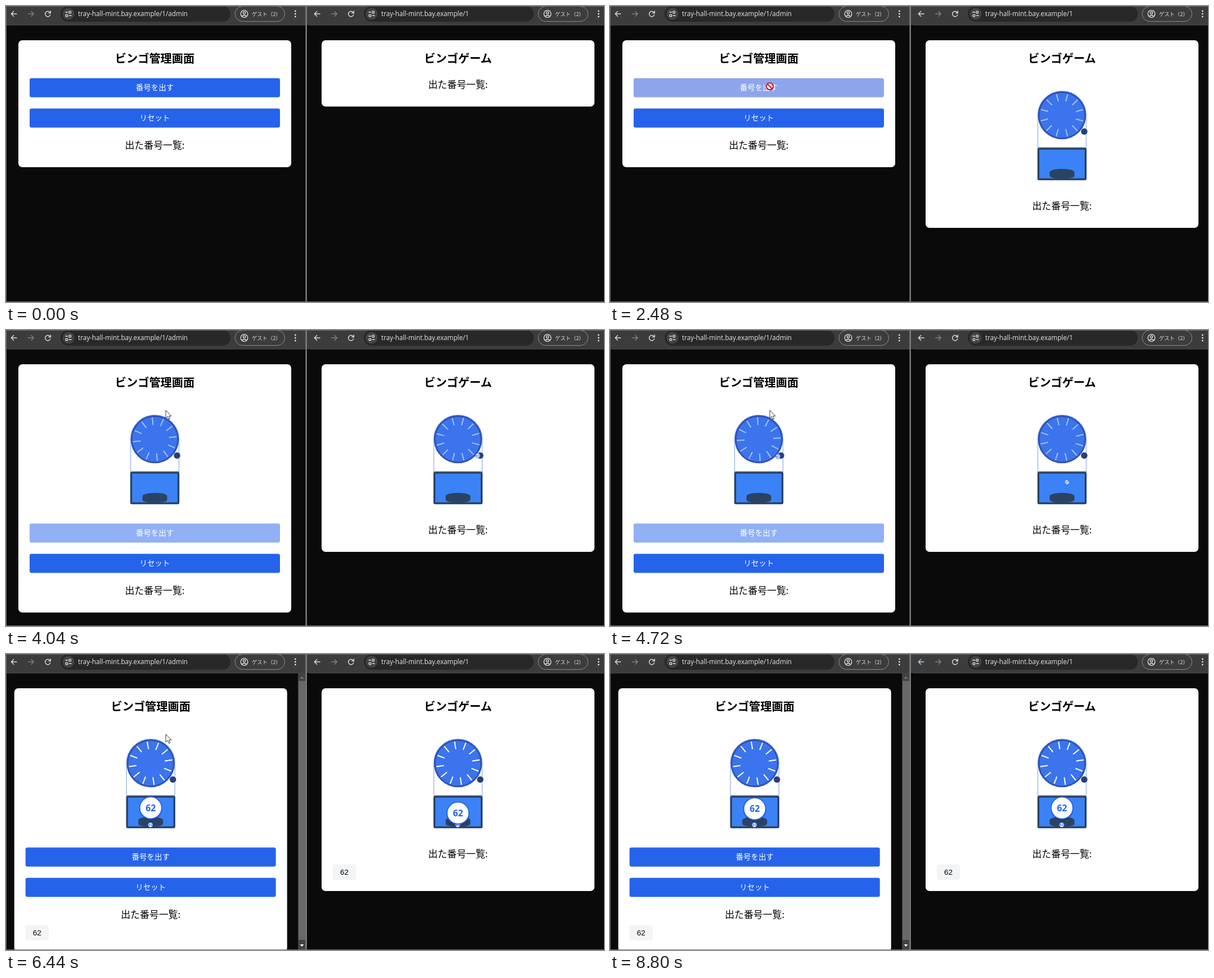
Animation, 1063 px wide and 527 px high, one loop 8.87 s. Source, as an HTML page:

```html
<!DOCTYPE html>
<html lang="ja">
<head>
<meta charset="utf-8">
<title>ビンゴ</title>
<style>
  html, body { margin: 0; width: 100%; height: 100%; overflow: hidden; background: #0a0a0a; }
  svg { display: block; width: 1063px; height: 527px; }
  text { font-family: "Noto Sans CJK JP", "Noto Sans CJK", "Noto Sans", sans-serif; }
  .mid { text-anchor: middle; }
  .title { font-size: 20.2px; font-weight: 700; }
  .list { font-size: 16.9px; }
  .label { font-size: 13.5px; fill: #fff; }
  .chip { font: 13.5px "Liberation Sans", Arial, sans-serif; }
  .url { font: 11.7px "Open Sans", "Noto Sans", sans-serif; fill: #e6e6e6; }
  .guest { font-size: 9.3px; fill: #dcdcdc; }
  .ball { font-family: "Open Sans", "Noto Sans", sans-serif; font-weight: 700; fill: #2563eb; }
</style>
</head>
<body>
<svg id="stage" viewBox="0 0 1063 527"></svg>
<script>
const LOOP = 8870, SPIN = 3000, MACHINE_H = 216, CHIP_H = 27;
const HOST = 'tray-hall-mint.bay.example';

const toolbar = path => `
  <rect width="533" height="34" fill="#3c3c3c"/>
  <rect y="33.5" width="533" height="1" fill="#4a4a4a"/>
  <g fill="none" stroke="#dedede" stroke-width="1.4">
    <path class="back" d="M19.500 14H9.500M14 9.300L9.300 14L14 18.700"/>
    <path d="M39 14H49M44.500 9.300L49.200 14L44.500 18.700" stroke="#808080"/>
    <path d="M78.300 11.500A4.700 4.700 0 1 0 79 15.200"/>
    <path d="M79.300 8.600V12.500H75.400"/>
  </g>
  <rect x="97" y="0" width="302" height="28" rx="14" fill="#282828"/>
  <circle cx="111" cy="14" r="10.500" fill="#434343"/>
  <g fill="none" stroke="#e2e2e2" stroke-width="1.300">
    <path d="M105.500 11H110M112 17H116.500"/>
    <circle cx="113.700" cy="11" r="1.900"/><circle cx="108" cy="17" r="1.900"/>
  </g>
  <text class="url" x="128" y="18">${HOST}${path}</text>
  <rect x="407" y=".5" width="88.500" height="27" rx="13.500" fill="none" stroke="#8c8c8c"/>
  <g fill="none" stroke="#e2e2e2" stroke-width="1.300">
    <circle cx="423.500" cy="14" r="6.300"/><circle cx="423.500" cy="12.200" r="2.100"/>
    <path d="M419.300 18.300Q423.500 14.600 427.700 18.300"/>
  </g>
  <text class="guest" x="437" y="17.500">ゲスト（2）</text>
  ${[9, 14, 19].map(y => `<circle cx="514.300" cy="${y}" r="1.400" fill="#e2e2e2"/>`).join('')}`;

const ticks = Array.from({ length: 12 }, (_, i) =>
  `<path d="M0 -25.500V-39" transform="rotate(${i * 30 - 9})"/>`).join('');

const machine = `
  <g class="machine" transform="translate(264.5 0)">
    <path d="M-43 252V194.500A43 43 0 0 1 43 194.500V252Z" fill="#fff" stroke="#9ab8f6" stroke-width="1.400"/>
    <rect x="-42" y="254" width="84" height="54.500" rx="1.500" fill="#3b82f6" stroke="#2a4365" stroke-width="3.400"/>
    <path d="M-22 296C-22 288 22 288 22 296V302C22 309.500 -22 309.500 -22 302Z" fill="#2a4365"/>
    <g transform="translate(0 194.500)">
      <circle r="41.300" fill="#3b74ec" stroke="#2f53b7" stroke-width="3"/>
      <g class="ticks" stroke="#fff" stroke-width="2">${ticks}</g>
    </g>
    <circle cx="39.500" cy="223.500" r="5.700" fill="#2a4077"/>
    <g class="small">
      <circle r="4.200" fill="#fff" stroke="#2563eb" stroke-width=".9"/>
      <text class="ball mid" y="2" font-size="5.600">62</text>
    </g>
    <g class="big">
      <circle cy="2.500" r="20.500" fill="#000" opacity=".1"/>
      <circle r="19.500" fill="#fff" stroke="#2563eb" stroke-width="1.800"/>
      <text class="ball mid" y="5.700" font-size="15.800">62</text>
    </g>
  </g>`;

const button = (name, y, label) => `
  <rect class="${name}" x="42" y="${y}" width="445" height="34" rx="3.400"/>
  <text class="label mid" x="264.500" y="${y + 21.3}">${label}</text>`;

const pane = ({ id, x, path, title, buttons, listY }) => `
  <g id="${id}" transform="translate(${x} 0)">
    <g class="content">
      <rect class="card" x="22" y="61" width="485" rx="7" fill="#fff"/>
      <text class="title mid" x="264.500" y="101.300">${title}</text>
      ${machine}
      <g class="below">
        ${buttons}
        <text class="list mid" x="264.500" y="${listY}">出た番号一覧:</text>
        <g class="result">
          <rect x="42" y="${listY + 13}" width="41" height="27" rx="3.400" fill="#f3f4f6"/>
          <text class="chip mid" x="62.500" y="${listY + 31.2}">62</text>
        </g>
      </g>
    </g>
    ${toolbar(path)}
  </g>`;

const cursors = `
  <g id="cursor">
    <path class="arrow" d="M0 0V14L3.200 11L5.500 16L7.800 15L5.500 10.200H10Z" fill="#fff" stroke="#222" stroke-width=".9"/>
    <path class="hand" d="M-1.500 0Q0 -1.500 1.500 0V6Q3 4.800 4.200 6.200Q5.800 5.400 6.800 7Q8.800 6.400 9 8.500V12L7.500 17H-1.500L-5 11.500Q-5.500 9 -3.300 9.300L-1.500 11Z" fill="#fff" stroke="#222" stroke-width=".9"/>
    <g class="ban" fill="#fff" stroke="#c8102e" stroke-width="2">
      <circle r="6"/><path d="M-4.200 -4.200L4.200 4.200"/>
    </g>
  </g>`;

const stage = document.getElementById('stage');
stage.innerHTML = `
  <rect width="1063" height="527" fill="#0a0a0a"/>
  ${pane({ id: 'admin', x: 0, path: '/1/admin', title: 'ビンゴ管理画面', listY: 253.7,
    buttons: button('draw', 128.5, '番号を出す') + button('reset', 182.5, 'リセット') })}
  <g id="scrollbar">
    <rect x="519" y="34" width="14" height="493" fill="#424242"/>
    <rect x="520" y="48" width="12" height="461" fill="#686868"/>
    <path d="M522.500 44L526 40L529.500 44Z" fill="#777"/>
    <path d="M522.500 517L526 521L529.500 517Z" fill="#fff"/>
  </g>
  ${pane({ id: 'player', x: 539, path: '/1', title: 'ビンゴゲーム', buttons: '', listY: 145.7 })}
  <rect x="533" width="6" height="34" fill="#3c3c3c"/>
  <rect x="532.500" width="2.300" height="527" fill="#858585"/>
  <path d="M0 .5H1063M.5 0V527M0 526.500H1063" fill="none" stroke="#747474"/>
  ${cursors}`;

const find = selector => stage.querySelector(selector);
const show = (el, on) => el.setAttribute('display', on ? 'inline' : 'none');
const move = (el, x, y, angle = 0) =>
  el.setAttribute('transform', `translate(${x} ${y}) rotate(${angle})`);
const clamp = v => Math.min(1, Math.max(0, v));

// CSS-style cubic bezier easing, solved by bisection
function bezier(x1, y1, x2, y2) {
  const at = (a, b, s) => 3 * (1 - s) ** 2 * s * a + 3 * (1 - s) * s * s * b + s ** 3;
  return x => {
    let lo = 0, hi = 1;
    for (let i = 0; i < 24; i++) {
      const s = (lo + hi) / 2;
      if (at(x1, x2, s) < x) lo = s; else hi = s;
    }
    return at(y1, y2, (lo + hi) / 2);
  };
}
const easeInOut = bezier(.42, 0, .58, 1);
const fall = bezier(.8, 0, 1, 1);

function makePane(id, start, base, wide) {
  const part = name => find(`#${id} .${name}`);
  const el = {};
  for (const name of ['content', 'card', 'machine', 'ticks', 'small', 'big', 'below', 'result']) el[name] = part(name);
  return t => {
    const age = t - start, open = age >= 0, done = age >= SPIN, listed = age >= SPIN + 500;
    show(el.machine, open);
    show(el.result, listed);
    show(el.small, age >= 2000);
    show(el.big, done);
    move(el.content, wide && listed ? -7.3 : 0, 0);
    move(el.below, 0, open ? MACHINE_H : 0);
    el.card.setAttribute('height', base + (open ? MACHINE_H : 0) + (listed ? CHIP_H : 0));
    el.ticks.setAttribute('transform', `rotate(${360 * easeInOut(clamp(age / SPIN))})`);
    el.ticks.setAttribute('opacity', done ? 1 : .55);

    const p = clamp((age - 2000) / 1000) ** 2.2;
    move(el.small, 36 * (1 - p) ** 1.5 - .5, 223 + 81.3 * p, (1 - p) * 360);

    const phase = (Math.max(0, age - SPIN) % 1000) / 500;
    move(el.big, 0, 273.7 + 10 * fall(phase < 1 ? phase : 2 - phase));
    return { open, listed };
  };
}
const updateAdmin = makePane('admin', 2530, 226, true);
const updatePlayer = makePane('player', 1935, 118, false);

const route = [
  [70, 579, 247], [470, 284, 143], [6790, 284, 143],
  [7410, 1038, 375], [7620, 1050, 454], [7900, 1058, 500], [8200, 1066, 505]
];
function cursorAt(t) {
  const i = route.findIndex(stop => stop[0] > t);
  if (i < 1) return null;
  const [a, ax, ay] = route[i - 1], [b, bx, by] = route[i];
  const u = (t - a) / (b - a), p = u * (2 - u);
  return { x: ax + (bx - ax) * p, y: ay + (by - ay) * p };
}

const drawButton = find('.draw'), resetButton = find('.reset');
const cursor = find('#cursor'), back = find('#player .back');

function render(t) {
  const { open, listed } = updateAdmin(t);
  updatePlayer(t);
  show(find('#scrollbar'), listed);

  const pos = cursorAt(t);
  const over = top => {
    const y = top + (open ? MACHINE_H : 0);
    return !!pos && pos.x >= 42 && pos.x <= 487 && pos.y >= y && pos.y <= y + 34;
  };
  const overDraw = over(128.5), overReset = over(182.5);
  const disabled = t >= 1000 && !listed;
  drawButton.setAttribute('fill', overDraw ? '#1d4ed8' : '#2563eb');
  drawButton.setAttribute('opacity', disabled ? .5 : 1);
  resetButton.setAttribute('fill', overReset ? '#1d4ed8' : '#2563eb');

  show(cursor, !!pos);
  if (pos) move(cursor, pos.x, pos.y);
  const kind = overDraw && t >= 1070 && disabled ? 'ban' : overDraw || overReset ? 'hand' : 'arrow';
  for (const name of ['arrow', 'hand', 'ban']) show(find(`#cursor .${name}`), name === kind);
  back.setAttribute('stroke', t >= 8600 ? '#b4d2f2' : '#dedede');
}

const began = performance.now();
function tick() {
  render((performance.now() - began) % LOOP);
  requestAnimationFrame(tick);
}
tick();
</script>
</body>
</html>
```
